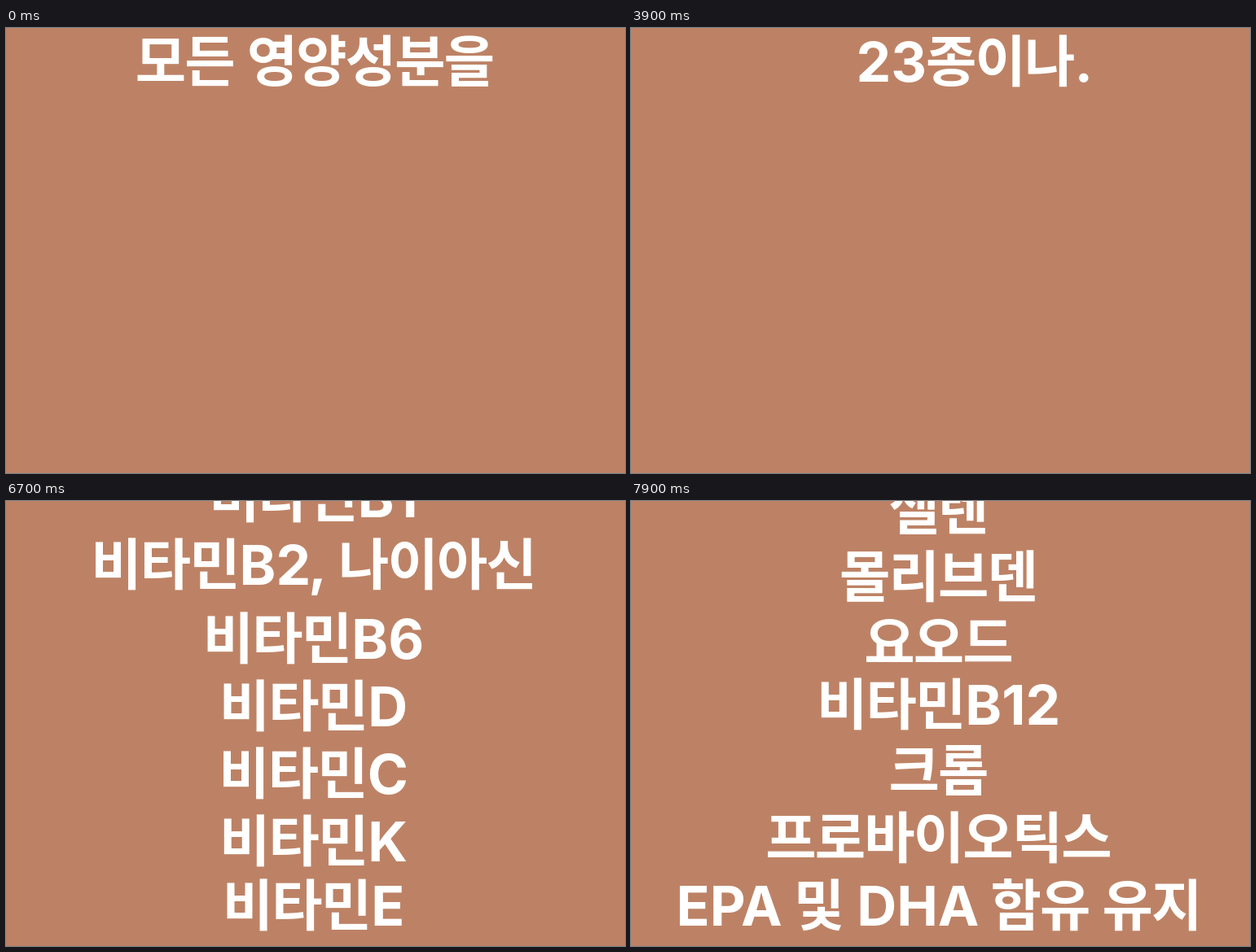
These frames come from a looping animation (760 px wide and 547 px high, 8 s). An HTML page with a canvas:

```html
<!DOCTYPE html>
<html lang="ko">
<head>
<meta charset="utf-8">
<style>
  html, body { margin: 0; width: 100%; height: 100%; overflow: hidden; background: #bd8265; }
  canvas { display: block; }
</style>
</head>
<body>
<canvas id="stage" width="760" height="547"></canvas>
<script>
const ctx = document.getElementById('stage').getContext('2d');
const LOOP = 8000, SIZE = 67.8, HANGUL_ADVANCE = 60.5, HANGUL = /[가-힣]/;
const COMMA_KERN = 3, WORD_SPACING = -1;
const TITLE_Y = 66, LAST_LINE_Y = 522, NUMBER_X = 363;

// Each line: appearance time, text, distance from the baseline above (83 if omitted)
const lines = [
  [4100, '비타민A', 67], [4600, '비타민B1'], [5100, '비타민B2, 나이아신'], [5600, '비타민B6', 91],
  [6100, '비타민D'], [6300, '비타민C'], [6500, '비타민K'], [6700, '비타민E', 79],
  [6800, '판토텐산, 비오틴'], [6900, '엽산', 91], [7000, '철'], [7100, '구리'],
  [7200, '아연'], [7300, '셀렌'], [7400, '몰리브덴'], [7500, '요오드', 81],
  [7600, '비타민B12', 76], [7700, '크롬', 81], [7800, '프로바이오틱스'], [7900, 'EPA 및 DHA 함유 유지']
];
let baseline = 0;
const list = lines.map(([start, text, gap = 83]) => ({ start, text, y: baseline += gap }));

// Quick number shuffle that slows down before it stops
const shuffle = [
  [1500, 5], [2400, 41], [2500, 13], [2600, 47], [2700, 8], [2800, 36], [2900, 5],
  [3000, 42], [3100, 19], [3300, 24], [3500, 18], [3700, 29], [3900, 23]
];

function setFont(run) {
  const korean = HANGUL.test(run);
  ctx.font = `700 ${SIZE}px ${korean ? '"Noto Sans CJK KR"' : 'Inter'}, sans-serif`;
  ctx.letterSpacing = '0px';
  ctx.wordSpacing = WORD_SPACING + 'px';
  const spacing = korean ? HANGUL_ADVANCE - ctx.measureText('가').width : 0;
  ctx.letterSpacing = spacing + 'px';
  return spacing;
}

function runWidth(run, next = '') {
  if (HANGUL.test(run)) return run.length * HANGUL_ADVANCE;
  setFont(run);
  return ctx.measureText(run).width - (next[0] === ',' ? COMMA_KERN : 0);
}

// align: 0 left, 0.5 centre, 1 right
function drawText(text, x, y, align = 0) {
  const runs = text.match(/[가-힣]+|, *|[^가-힣,]+/g);
  const widths = runs.map((run, i) => runWidth(run, runs[i + 1]));
  x -= align * widths.reduce((sum, w) => sum + w, 0);
  runs.forEach((run, i) => {
    const spacing = setFont(run);
    ctx.fillText(run, x + spacing / 2, y);
    x += widths[i];
  });
}

function drawCount(t) {
  const blinkedOff = t < 2400 && Math.floor(t / 100) % 2 === 0;
  if (t < 1500 || blinkedOff) {
    drawText('무려', 143, TITLE_Y);
    return;
  }
  const value = shuffle.filter(([start]) => start <= t).pop()[1];
  drawText(String(value), NUMBER_X, TITLE_Y, 1);
  drawText('종이나.', NUMBER_X, TITLE_Y);
}

function drawList(t) {
  const shown = list.filter(line => line.start <= t);
  const scroll = Math.max(0, shown[shown.length - 1].y - LAST_LINE_Y);
  for (const { text, y } of shown) {
    if (y - scroll > -20) drawText(text, 378, y - scroll, 0.5);
  }
}

function draw(now) {
  const t = now % LOOP;
  ctx.fillStyle = '#bd8265';
  ctx.fillRect(0, 0, 760, 547);
  ctx.fillStyle = '#fff';
  if (t < 500) drawText('모든 영양성분을', 379.5, TITLE_Y, 0.5);
  else if (t < 1000) drawText('가득 담았습니다.', 379.5, TITLE_Y, 0.5);
  else if (t < 4100) drawCount(t);
  else drawList(t);
}

const begin = performance.now();
function tick() {
  draw(performance.now() - begin);
  requestAnimationFrame(tick);
}
tick();
</script>
</body>
</html>
```
